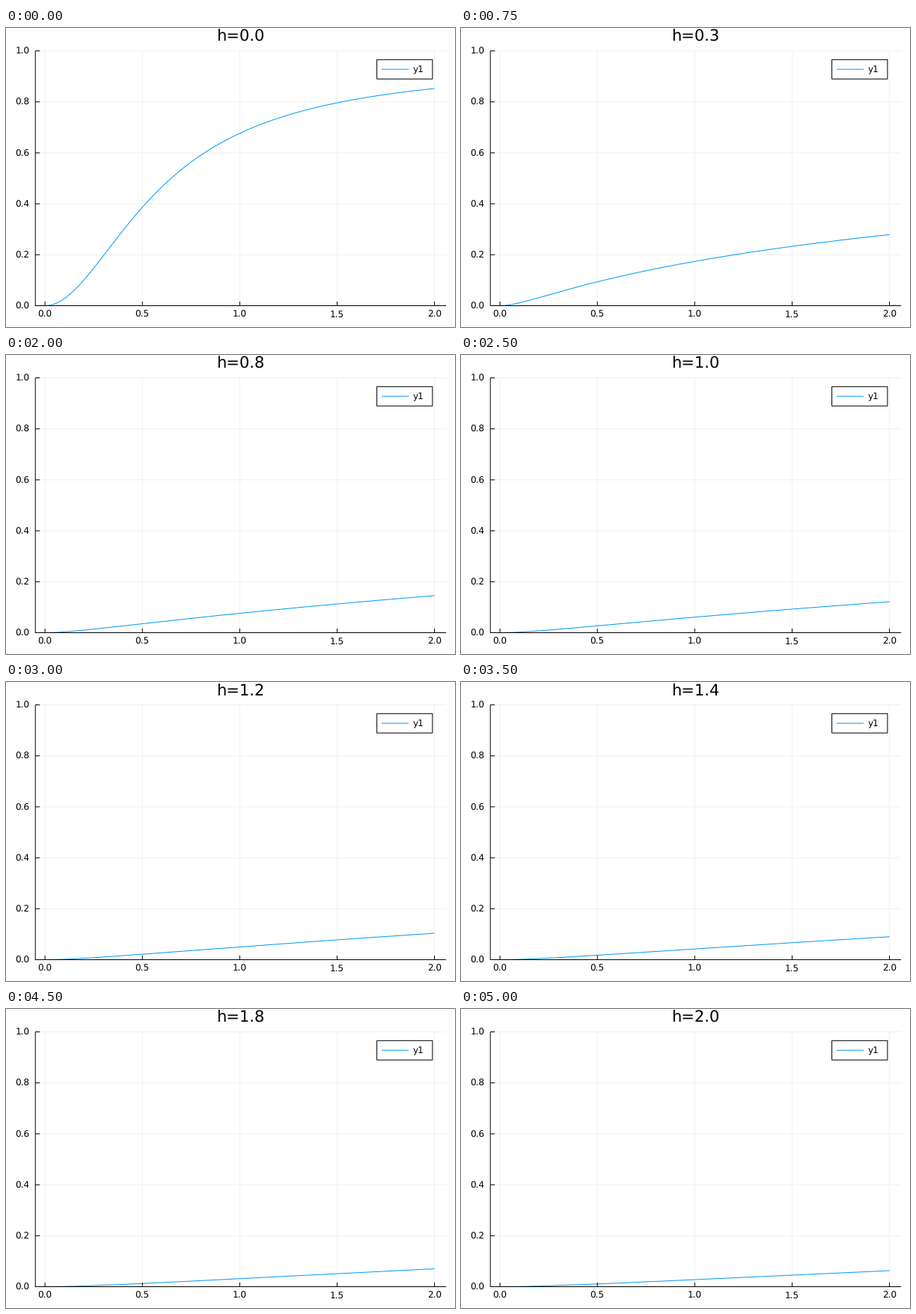
A matplotlib script for the animation above (5250 ms loop, 600x400 px).

```python
import numpy as np
import matplotlib.pyplot as plt
from matplotlib.animation import FuncAnimation
from matplotlib.patches import Rectangle

W, H, DPI = 600, 400, 100
PX = 72 / DPI
FRAMES, INTERVAL = 21, 250
LEFT, RIGHT, TOP, BOTTOM = 39.2, 588.1, 30.6, 371.5
X_MIN, X_MAX = -0.0497, 2.0597
BLUE, GRID = "#009af9", "#f0f0f0"

plt.rcParams.update({
    "font.family": "DejaVu Sans",
    "text.hinting": "no_hinting",
    "path.snap": False,
})
fig = plt.figure(figsize=(W / DPI, H / DPI), dpi=DPI, facecolor="white")
ax = fig.add_axes([0, 0, 1, 1])
ax.set(xlim=(0, W), ylim=(H, 0))
ax.axis("off")


def to_px(x, y):
    px = LEFT + (RIGHT - LEFT) * (x - X_MIN) / (X_MAX - X_MIN)
    return px, BOTTOM - (BOTTOM - TOP) * y


def line(xs, ys, color="black", **kw):
    return ax.plot(xs, ys, color=color, lw=PX, solid_capstyle="butt", **kw)[0]


def text(x, y, s, size=12, ha="center"):
    return ax.text(x, y, s, fontsize=size * PX, ha=ha, va="baseline", zorder=6)


def response(x, h):
    """Saturating curve that flattens as h grows."""
    base = 0.3296 * np.exp(0.372 * x) / x**2
    bend = 13 * np.exp(-2.3 * h**0.8) * (np.sqrt(x) - np.sqrt(0.5))
    damping = h / x * (11.85 + 2.7 * h / x + bend)
    return 1 / (1 + base + damping)


# Grid, axes and ticks
for v in np.linspace(0, 2, 5):
    px, _ = to_px(v, 0)
    line([px, px], [TOP, BOTTOM], GRID, zorder=1)
    line([px, px], [BOTTOM - 5.5, BOTTOM], zorder=4)
    text(px, 387, f"{v:.1f}")
for v in np.linspace(0, 1, 6):
    _, py = to_px(0, v)
    line([LEFT, RIGHT], [py, py], GRID, zorder=1)
    line([LEFT, LEFT + 6], [py, py], zorder=4)
    text(31.3, py + 4.4, f"{v:.1f}", ha="right")
line([LEFT, LEFT], [TOP, BOTTOM + 0.5], zorder=4)
line([LEFT, RIGHT], [BOTTOM, BOTTOM], zorder=4)

# Legend
ax.add_patch(Rectangle((495.6, 42.3), 74.3, 25.9, fc="white", ec="black",
                       lw=PX, zorder=4))
line([502, 538], [55.2, 55.2], BLUE, zorder=5)
text(544, 59.5, "y1", ha="left")

title = text(313.5, 18, "", size=21)
curve = line([], [], BLUE, zorder=3)
xs = np.linspace(0.01, 2, 200)


def update(i):
    h = i / 10
    title.set_text(f"h={h:.1f}")
    curve.set_data(*to_px(xs, response(xs, h)))
    return title, curve


anim = FuncAnimation(fig, update, frames=FRAMES, interval=INTERVAL,
                     repeat=True, repeat_delay=0)
plt.show()
```
